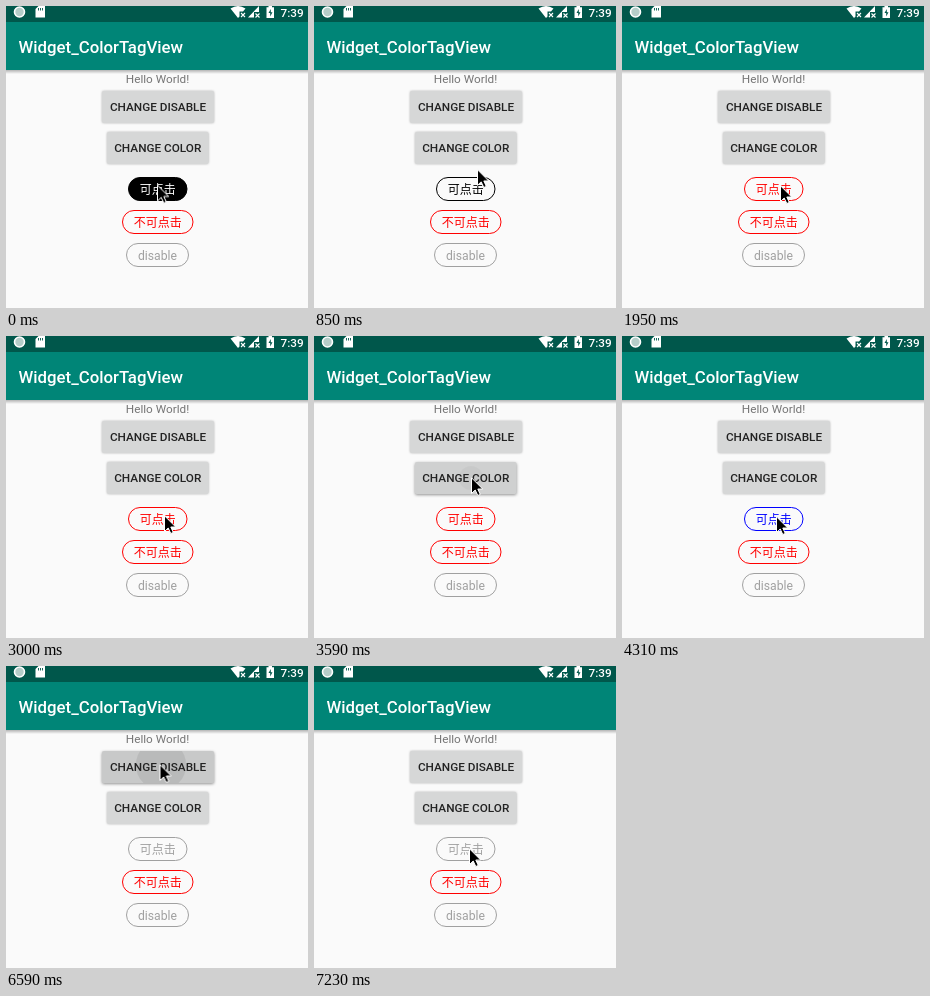
An HTML page that plays this animation: 302 px wide and 302 px high, repeating every 8 s.

```html
<!DOCTYPE html>
<html lang="zh-CN">
<head>
<meta charset="utf-8">
<title>Widget_ColorTagView</title>
<style>
  html, body { margin: 0; width: 100%; height: 100%; overflow: hidden; background: #fafafa; }
  #stage { display: block; width: 100vw; height: 100vh; font: 11.75px Roboto, sans-serif; }
  .mid { text-anchor: middle; }
  .medium { font-weight: 500; }
  .pill text { font: 12px "Noto Sans CJK SC", "Noto Sans CJK", sans-serif; text-anchor: middle; }
  .pill rect { fill: #fafafa; stroke: currentColor; }
  .pill text { fill: currentColor; }
  .pill .latin { font: 12.2px Roboto, sans-serif; }
  .face { fill: #d6d7d7; filter: drop-shadow(0 .7px .9px rgba(0,0,0,.28)); }
  .label { fill: #222; font-weight: 500; text-anchor: middle; }
</style>
</head>
<body>
<svg id="stage" viewBox="0 0 302 302">
  <defs>
    <linearGradient id="barShadow" x2="0" y2="1">
      <stop stop-color="#000" stop-opacity=".28"/>
      <stop offset="1" stop-color="#000" stop-opacity="0"/>
    </linearGradient>
  </defs>
  <rect width="302" height="302" fill="#fafafa"/>
  <rect y="64" width="302" height="4" fill="url(#barShadow)"/>
  <rect width="302" height="64" fill="#008577"/>
  <rect width="302" height="16" fill="#00574b"/>

  <g id="status" fill="#fff">
    <circle cx="13.5" cy="6" r="5" fill="#b5cdc9" stroke="#fff" stroke-width="1.6"/>
    <path d="M32.5 0H39V11.5H29.5V3Z"/>
    <path d="M32.5 2v2.5M34.5 2v2.5M36.5 2v2.5" stroke="#00574b" stroke-width=".9"/>
    <path d="M224.5 2.5Q232 -2.5 239.5 2.5L237 5.5H233.5V10.5L232 12Z"/>
    <path d="M235 7l4 4m0-4l-4 4" stroke="#fff" stroke-width="1.1"/>
    <path d="M253 0V6H248V11.5H242Z"/>
    <path d="M249.5 7.5l4 4m0-4l-4 4" stroke="#fff" stroke-width="1.1"/>
    <path d="M262.5 0h3.5v1.2h2V12h-7.500V1.200h2Z"/>
    <path d="M264.800 3l-2.300 4h1.700v3.500l2.300-4.300h-1.700Z" fill="#00574b"/>
    <text x="274.500" y="11" class="medium">7:39</text>
  </g>

  <text x="12.500" y="47" fill="#fff" font-size="16.800" class="medium">Widget_ColorTagView</text>
  <text x="151.500" y="77" fill="#757575" class="mid">Hello World!</text>
  <g id="buttons"></g>
  <g id="pills"></g>
  <path id="cursor" d="M.5.800V16.500L4.200 13L6.800 18.500L9.300 17.400L6.800 12H11.700Z" stroke="#fff"/>
</svg>

<script>
const LOOP = 8000;
const byId = id => document.getElementById(id);

function add(parent, tag, attrs, text = '') {
  const el = document.createElementNS('http://www.w3.org/2000/svg', tag);
  for (const key in attrs) el.setAttribute(key, attrs[key]);
  el.textContent = text;
  return parent.appendChild(el);
}

// steps: [ms, props] pairs; the last pose holds until the loop restarts
function play(el, steps, easing = 'linear') {
  const frames = steps.map(([ms, props]) => ({ offset: ms / LOOP, easing, ...props }));
  if (steps[0][0] > 0) frames.unshift({ ...frames[0], offset: 0 });
  frames.push({ ...frames[frames.length - 1], offset: 1 });
  el.animate(frames, { duration: LOOP, iterations: Infinity });
}

function makePill(x, y, width, label, color, latin) {
  const group = add(byId('pills'), 'g', { class: 'pill', color });
  const rect = add(group, 'rect', { x: x + .5, y: y + .5, width: width - 1, height: 23, rx: 11.5 });
  const text = add(group, 'text',
    { x: x + width / 2, y: y + 16.5, class: latin ? 'latin' : '' }, label);
  return { rect, text };
}

const shadow = (dy, blur, alpha) => ({ filter: `drop-shadow(0 ${dy}px ${blur}px rgba(0,0,0,${alpha}))` });
const idle = shadow(.7, .9, .28);
const raised = shadow(1.2, 1.8, .42);

// presses: [start, length, touchX, touchY]
function makeButton(x, y, width, label, presses) {
  const group = byId('buttons');
  const face = add(group, 'rect', { x, y, width, height: 32, rx: 1.7, class: 'face' });
  const clip = add(group, 'svg', { x, y, width, height: 32, overflow: 'hidden' });
  const tint = add(clip, 'rect', { width, height: 32, rx: 1.7, opacity: 0 });
  const faceSteps = [[0, idle]], tintSteps = [[0, { opacity: 0 }]];
  for (const [start, length, touchX, touchY] of presses) {
    const end = start + length;
    faceSteps.push([start - 1, idle], [start, raised], [end - 100, raised], [end, idle]);
    tintSteps.push([start - 1, { opacity: 0 }], [start, { opacity: .03 }],
      [start + 80, { opacity: .06 }], [end - 120, { opacity: .06 }], [end, { opacity: 0 }]);
    const ripple = add(clip, 'circle', { cx: touchX - x, cy: touchY - y, r: 10, opacity: 0 });
    play(ripple, [
      [start - 1, { r: '10px', opacity: 0 }],
      [start, { r: '12px', opacity: .03 }],
      [start + length * .5, { r: '26px', opacity: .07 }],
      [end, { r: '60px', opacity: 0 }]
    ]);
  }
  play(face, faceSteps);
  play(tint, tintSteps);
  add(group, 'text', { x: x + width / 2, y: y + 20.2, class: 'label' }, label);
}

makeButton(96, 85, 112, 'CHANGE DISABLE', [[6450, 300, 155, 99]]);
makeButton(101, 126, 101.5, 'CHANGE COLOR', [[1170, 300, 158, 145], [3590, 280, 157, 142]]);

const tag = makePill(122, 171, 59.5, '可点击', '#000');
makePill(116, 204, 71.5, '不可点击', '#f00');
makePill(120, 237, 63, 'disable', '#a0a0a0', true);

// [ms, colour, pressed]
const tagStates = [
  [0, '#000', true], [150, '#000'],
  [1260, '#f00'], [2310, '#f00', true], [3000, '#f00'],
  [3690, '#00f'], [4520, '#00f', true], [5290, '#00f'],
  [6560, '#a0a0a0']
];
play(tag.rect, tagStates.map(([ms, color, pressed]) =>
  [ms, { stroke: color, fill: pressed ? color : '#fafafa' }]), 'steps(1, end)');
play(tag.text, tagStates.map(([ms, color, pressed]) =>
  [ms, { fill: pressed ? '#fff' : color }]), 'steps(1, end)');

// [ms, x, y] of the pointer tip
const pointer = [
  [0, 151, 178.5], [449, 151, 178.5], [850, 163, 163], [960, 158, 144],
  [1659, 158, 144], [1950, 158, 179],
  [3259, 158, 179], [3420, 157, 141],
  [4000, 157, 141], [4310, 154, 180],
  [5800, 154, 180], [5830, 155.5, 175], [6050, 161, 140], [6300, 153.5, 98],
  [6880, 153.5, 98], [7230, 155, 182]
];
play(byId('cursor'), pointer.map(([ms, x, y]) => [ms, { transform: `translate(${x}px, ${y}px)` }]));
</script>
</body>
</html>
```
